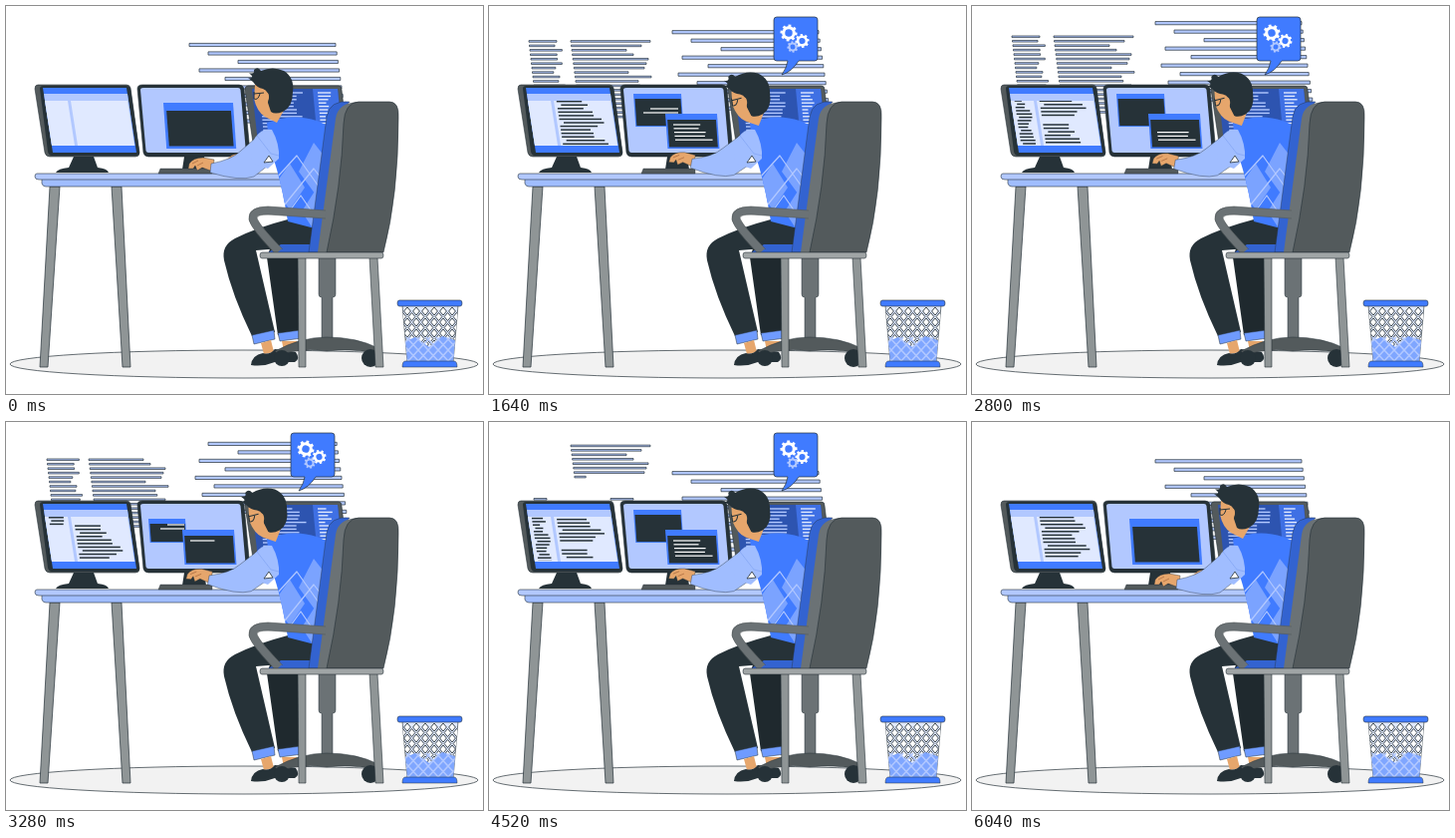
Animation of 479x389 px, one loop 6.08 s. Source, as an HTML page with a canvas:

```html
<!DOCTYPE html>
<html lang="en">
<head>
<meta charset="utf-8">
<title>Developer at work</title>
<style>
html, body { margin: 0; width: 100%; height: 100%; overflow: hidden; background: #fff; }
canvas { display: block; }
</style>
</head>
<body>
<canvas id="stage" width="479" height="389"></canvas>
<script>
const g = document.getElementById('stage').getContext('2d');
const LOOP = 6080;
const INK = '#263238', BLUE = '#407bff', PALE = '#b2c8ff', ICE = '#e0e9ff', SKY = '#a0bdff',
  DEEP = '#3363d0', GREY = '#8f9596', STEEL = '#6b7275', SLATE = '#535a5c', SKIN = '#e6a66c';

const clamp = v => Math.max(0, Math.min(1, v));
const ease = v => v * v * (3 - 2 * v);
const noise = n => { const v = Math.sin(n * 91.7 + 4) * 4375.5; return v - Math.floor(v); };

// Eased value between [time, value] pairs
function key(t, ...pairs) {
  for (let i = 1; i < pairs.length; i++) {
    const [t0, a] = pairs[i - 1], [t1, b] = pairs[i];
    if (t < t1) return a + (b - a) * ease(clamp((t - t0) / (t1 - t0)));
  }
  return pairs[pairs.length - 1][1];
}

function shape(d, fill, edge = 0, color = INK) {
  const p = new Path2D(d);
  if (fill) { g.fillStyle = fill; g.fill(p); }
  if (edge) { g.strokeStyle = color; g.lineWidth = edge; g.stroke(p); }
}

function disc(x, y, rx, ry, fill, edge = 0) {
  g.beginPath();
  g.ellipse(x, y, rx, ry, 0, 0, 7);
  g.fillStyle = fill;
  g.fill();
  if (edge) { g.lineWidth = edge; g.strokeStyle = INK; g.stroke(); }
}

function inside(d, draw) {
  g.save();
  g.clip(new Path2D(d));
  draw();
  g.restore();
}

function around(x, y, angle, scale, draw) {
  g.save();
  g.translate(x, y);
  g.rotate(angle);
  g.scale(scale, scale);
  g.translate(-x, -y);
  draw();
  g.restore();
}

function bar(x0, x1, y, h, part = 1) {
  const w = (x1 - x0) * clamp(part);
  if (w <= 0) return;
  g.fillStyle = PALE;
  g.fillRect(x0, y - h / 2, w, h);
  g.strokeStyle = INK;
  g.lineWidth = .7;
  g.strokeRect(x0, y - h / 2, w, h);
}

function rule(x0, x1, y, color, h = 1.5) {
  g.fillStyle = color;
  g.fillRect(x0, y - h / 2, x1 - x0, h);
}

// Floating code behind the desk
const starts = [184, 203, 233, 194, 220, 190, 209, 197, 225, 200];
const ends = [162, 153, 138, 145, 160, 158, 156, 140, 163, 150];

function rightCode(t) {
  for (let i = 0; i < 10; i++) {
    const x0 = starts[i], x1 = 331 + i * 1.2, y = 39 - .0078 * t + 8.5 * i;
    const cleared = i < 4 && t > 400 + 80 * i;
    if (t < 3250 + 45 * i) bar(x0, x1, y, 3.2, cleared ? (t - 860) / 100 - i : 1);
    bar(x0, x1, y + .0078 * LOOP, 3.2, (t - 3500) / 100 - i);
  }
}

function leftCode(t) {
  for (let i = 0; i < 18; i++) {
    const y = 42 - .004 * t + 4.45 * i;
    const gone = 3220 + 40 * i, first = t < gone;
    let part = i < 8 ? (t - 700) / 100 - i : (t - 820) / 70 - (i - 8);
    if (!first) part = t < 5500 + 20 * i ? (t - 3800) / 100 - i : 0;
    const x = 82 + i * .55;
    bar(x, i < 10 ? ends[i] : 148 + 20 * noise(i), y, 1.6, part);
    if (first && i < 12) bar(40 + i * .5, i ? 62 + 15 * noise(i + 3) : 68, y, 1.6, (t - 500) / 45 - i);
    if (i == 12 && t > 4300 && t < 4800) {
      bar(45, 58, y, 1.6);
      bar(122, 145, y, 1.6);
    }
  }
}

function leftScreen(t) {
  shape('M32 79H121Q124 79 125 82L134 147Q134 151 130 151H44Q40 151 39 147L29 83Q29 79 32 79Z', SLATE, .6);
  shape('M37 80H121Q124 80 125 83L134 147Q134 150 130 150H46Q43 150 42 146L34 83Q34 80 37 80Z', INK);
  shape('M37 82H121L131 147H47Z', BLUE);
  shape('M38 88H122L129.500 140H46Z', PALE);
  shape('M39 95H62L69 140H46Z', ICE);
  shape('M65 95H122L129 140H72Z', ICE);
  inside('M38 95H130V139H38Z', () => {
    const period = 62.8, gap = 138 - t * 3 * period / LOOP;
    for (let k = 0; k < 4; k++) for (let i = 0; i < 16; i++) {
      const y = gap + 5 + k * period + i * 3.55;
      if (y < 95 || y > 139) continue;
      const x = 68 + (y - 97) * .15 + (i % 5 == 2 ? 4 : 0);
      rule(x, x + 24 + 22 * noise(i + 20), y, INK);
    }
    const top = t < 1500 ? 150 - t * .062
      : t < 3700 ? key(t, [1500, 150], [2280, 126], [3280, 43], [3700, 20])
      : t < 5000 ? key(t, [3700, 150], [4520, 90], [5000, 30])
      : t < 5900 ? key(t, [5000, 150], [5440, 130], [5900, 118]) : 150;
    for (let i = 0; i < 19; i++) {
      const y = top + i * 3.3;
      if (y < 95) continue;
      const x = 43 + (y - 97) * .15 + (i % 4 == 1 ? 2 : 0);
      rule(x, x + 7 + 9 * noise(i + 50), y, INK);
    }
  });
  shape('M68 151H88L92 162Q102 163 103 167H50Q52 163 63 162Z', INK);
}

function panel(x, y, w, h, head, rim) {
  const s = .07 * h;
  shape(`M${x} ${y}h${w}l${s} ${h}h${-w}Z`, BLUE);
  shape(`M${x + rim + .5} ${y + head}h${w - 2 * rim}l${s - .5} ${h - head - rim}h${-w + 2 * rim}Z`, INK);
}

function midScreen(t) {
  shape('M137 79H234Q238 79 239 83L245 147Q245 151 241 151H143Q139 151 138 147L132 83Q132 79 137 79Z', INK, .6);
  shape('M138 82H233Q235 82 235.500 84L241 147H143Q141 147 140.500 145L135 84Q135 82 138 82Z', PALE);
  if (t > 480 && t < 5750) {
    const dip = key(t, [480, 1], [800, 0], [3000, 0], [3250, 1], [3350, 1], [3650, 0], [5000, 0], [5400, .45], [5750, 1]);
    panel(145 - 2 * dip, 88 + 9 * dip, 48 - 11 * dip, 33 - 9 * dip, 5, 1);
    const lines = key(t, [700, 0], [960, 2], [2700, 2], [2900, 0], [3150, 0], [3280, 2], [3700, 2], [4000, 0]);
    for (let i = 0; i < Math.floor(lines); i++) rule(162 - i * 7, 179 + 11 * (1 - dip), 103 + i * 4, '#fff', 1.2);
  }
  const big = key(t, [350, 1], [800, 0], [4800, 0], [5300, 1]);
  panel(177 - 19 * big, 108 - 11 * big, 52 + 18 * big, 35 + 11 * big, 6 + 2 * big, 1.6 + big);
  const from = key(t, [1300, 0], [2200, 2], [2900, 2], [2901, 0], [4600, 0], [5300, 2]);
  const to = t < 2900 ? (t - 760) / 50 : t < 5700 ? (t - 3200) / 90 : 0;
  for (let i = Math.floor(from); i < Math.min(5, to); i++) {
    const x = 185 + i * .5 - (i % 2 ? 0 : 13 * big);
    rule(x, x + (22 + 16 * noise(i + 9)) * clamp(to - i), 119 + 3.8 * i, '#fff', 1.2);
  }
  shape('M179 151H199L201 164H177Z', INK);
}

function rightScreen(t) {
  shape('M243 80H334Q337 80 337 84L345 150H250L240 84Q240 80 243 80Z', SLATE, .6);
  shape('M247 83H333L341 147H254Z', '#2d54b0');
  shape('M308 83H333L337 125H312Z', '#3f70e4');
  for (let i = 0; i < 13; i++) {
    const y = 87 + i * 3.4, flick = Math.floor(t / 400 + noise(i) * 3);
    rule(255 + i * .3, 284 + 18 * noise(i + flick), y, PALE, 1.4);
    rule(313 + i * .3, 320 + 8 * noise(i * 3 + flick), y, ICE, 1.4);
  }
}

function desk() {
  for (const d of ['M44 181H54L42 362H34Z', 'M106 181H116L125 362H117Z']) shape(d, GREY, .7);
  shape('M36 173H300V181H40Q37 181 36 178Z', SKY, .6);
  shape('M31 168H300V174H33Q29 174 29 171Q29 168 31 168Z', PALE, .6);
}

function legs() {
  shape('M268 235L312 218V248H262L295 250L296 328L273 330L262 252Z', '#1f292e');
  shape('M273 328L295 325L297 333L275 336Z', '#6f9bff', .5);
  shape('M277 336H292V346H279Z', SKIN);
  shape('M283 214L312 220Q309 240 302 241L251 245L270 327L247 331Q227 290 219 255Q216 240 230 233Q252 222 283 214Z', INK);
  shape('M247 330L269 325L270 334L249 339Z', '#6f9bff', .5);
  shape('M256 338L266 335L269 347L259 349Z', SKIN);
  shape('M246 360Q247 350 258 348Q265 350 270 344L291 347Q296 354 290 357L270 357Q258 362 246 360Z', INK);
  shape('M262 248L276 239H310V248Z', DEEP);
}

function torso() {
  const vest = 'M262 117Q288 107 312 115L326 121L314 224L283 216Q278 185 272 164Q264 140 262 117Z';
  shape(vest, BLUE);
  inside(vest, () => {
    shape('M285 158L300 182L285 204L268 182Z M309 137L330 164L313 192L294 166Z M311 184L325 205L310 226L297 206Z', '#7ba3ff');
    shape('M272 172L292 150L319 188M276 204L309 163L330 190M283 208L296 190L318 222', '', 1.2, PALE);
  });
}

function arm(t) {
  const lift = key(t, [400, 0], [850, 1], [1700, 1], [2280, .5], [3000, .9], [4600, 1], [5200, 0]);
  const tap = lift * Math.sin(t / 75) * .006;
  // far hand
  shape('M222 154Q228 147 236 149L240 156H224Z', SKIN);
  g.save();
  g.translate(-3 * lift, 0);
  around(268, 168, lift * .075 + tap, 1, () => {
    shape('M209 154L198 152Q188 152 184 158L183 163L188 163L190 160L192 165L197 162L208 166Z', SKIN, .4);
    shape('M187 158L193 155M192 160L198 157', '', .7, '#a8683d');
    shape('M206 158Q227 154 236 145L252 131L272 153L249 171Q235 176 205 167Z', SKY, .4);
  });
  g.restore();
  shape('M250 132Q257 122 267 124Q275 138 274 153L263 163L248 158Q243 146 250 132Z', SKY);
  shape('M252 130L266 148L274 150', '', .6, '#7c9ff0');
  // gap between arm and body
  shape('M259 157L264 150L268 156Z', '#fff', .8);
}

function head(t) {
  const tilt = key(t, [1100, 0], [1550, 1], [4650, 1], [5100, 0]);
  g.save();
  g.translate(-1 * tilt, 2.5 * tilt);
  around(275, 118, -.15 * tilt, 1, () => {
    shape('M250 79L249 93Q252 106 260 111L272 117L280 103L270 88L258 79Z', SKIN);
    shape('M248 76L243 72Q248 73 247 70L244 67Q250 69 249 64Q253 60 256 65Q268 60 279 65Q290 72 288 86Q288 101 278 106Q270 109 266 106L263 97Q265 85 258 83Q252 82 248 76Z', INK);
    disc(261, 91, 3, 4.5, SKIN);
    shape('M249 88L259 87M249 86V93Q253 95 255 88', '', 1, INK);
  });
  g.restore();
}

function chair() {
  shape('M314 250H331V289Q331 292 328 292V334H317V292Q314 292 314 289Z', STEEL, .5);
  shape('M270 346Q296 332 322 332Q352 332 374 343L372 348Q345 343 322 346Q294 342 274 351Z', SLATE, .5);
  disc(277, 353, 8, 8, INK);
  disc(366, 353, 9, 9, INK);
  shape('M293 252H301V362H294Z', GREY, .6);
  shape('M365 252H373L379 362H371Z', GREY, .6);
  shape('M345 96Q325 94 322 111L304 247H320L334 110Z', DEEP, .4);
  shape('M354 96Q333 97 331 113L313 247H330L345 110Z', STEEL);
  shape('M354 96H385Q395 96 394 112Q394 190 379 247H322Q337 180 339 118Q340 97 354 96Z', SLATE, .6);
  g.lineJoin = 'round';
  shape('M321 209L263 205Q246 205 248 214Q251 222 274 246', '', 8.2, STEEL);
  shape('M321 205L263 201Q244 201 244 214Q247 225 270 248M321 213L263 209Q252 209 252 213Q255 221 278 244', '', .6, SLATE);
  shape('M257 247H377Q379 247 379 250Q379 253 377 253H257Q255 253 255 250Q255 247 257 247Z', '#a0a5a6', .6);
}

function bin() {
  const body = 'M398 300H454L449 357H403Z';
  shape(body, ICE, .6);
  inside(body, () => {
    for (let r = 0; r < 7; r++) for (let k = 0; k < 8; k++) {
      const x = 394 + k * 9 + (r % 2) * 4.5, y = 306 + r * 5.5;
      shape(`M${x} ${y - 4}l3.400 4l-3.400 4l-3.400 -4Z`, '#fff', .9);
    }
    shape('M396 338L411 332L425 342L438 331L456 337V358H396Z', '#7fa6ff');
    for (let k = 0; k < 11; k++) {
      const x = 372 + k * 10;
      shape(`M${x} 332l24 26m0 -26l-24 26`, '', 1.5, PALE);
    }
  });
  shape('M395 295H456Q458 295 458 298Q458 301 456 301H395Q393 301 393 298Q393 295 395 295Z', BLUE, .6);
  shape('M401 356H450Q453 356 453 362H398Q398 356 401 356Z', BLUE, .5);
}

function gear(x, y, r, angle, color) {
  around(x, y, angle, 1, () => {
    g.fillStyle = g.strokeStyle = color;
    g.lineWidth = r * .36;
    g.beginPath();
    g.arc(x, y, r * .62, 0, 7);
    g.stroke();
    for (let i = 0; i < 8; i++)
      around(x, y, i * Math.PI / 4, 1, () => g.fillRect(x - r * .17, y - r, r * .34, r * .35));
  });
}

function bubble(t) {
  const size = key(t, [400, 0], [800, 1], [5800, 1], [6030, 0]);
  if (size <= 0) return;
  const turn = t / LOOP * Math.PI * 2;
  around(295, 68, 0, size, () => {
    shape('M289 11H327Q330 11 330 14V52Q330 55 327 55H311Q304 66 294 69Q299 62 300 55H289Q286 55 286 52V14Q286 11 289 11Z', BLUE, .7);
    gear(301, 27, 8.5, turn, '#fff');
    gear(314.500, 35, 7, -turn, '#fff');
    gear(305, 41, 5.6, -turn, PALE);
  });
}

function frame(now) {
  const t = now % LOOP;
  g.fillStyle = '#fff';
  g.fillRect(0, 0, 479, 389);
  disc(239, 359, 235, 14, '#f2f2f2', .7);
  rightCode(t);
  leftCode(t);
  rightScreen(t);
  leftScreen(t);
  midScreen(t);
  desk();
  shape('M155 163H207V168H153Z', SLATE, .4);
  legs();
  torso();
  head(t);
  arm(t);
  chair();
  bin();
  bubble(t);
}

const begin = performance.now();
function tick() {
  frame(performance.now() - begin);
  requestAnimationFrame(tick);
}
tick();
</script>
</body>
</html>
```
